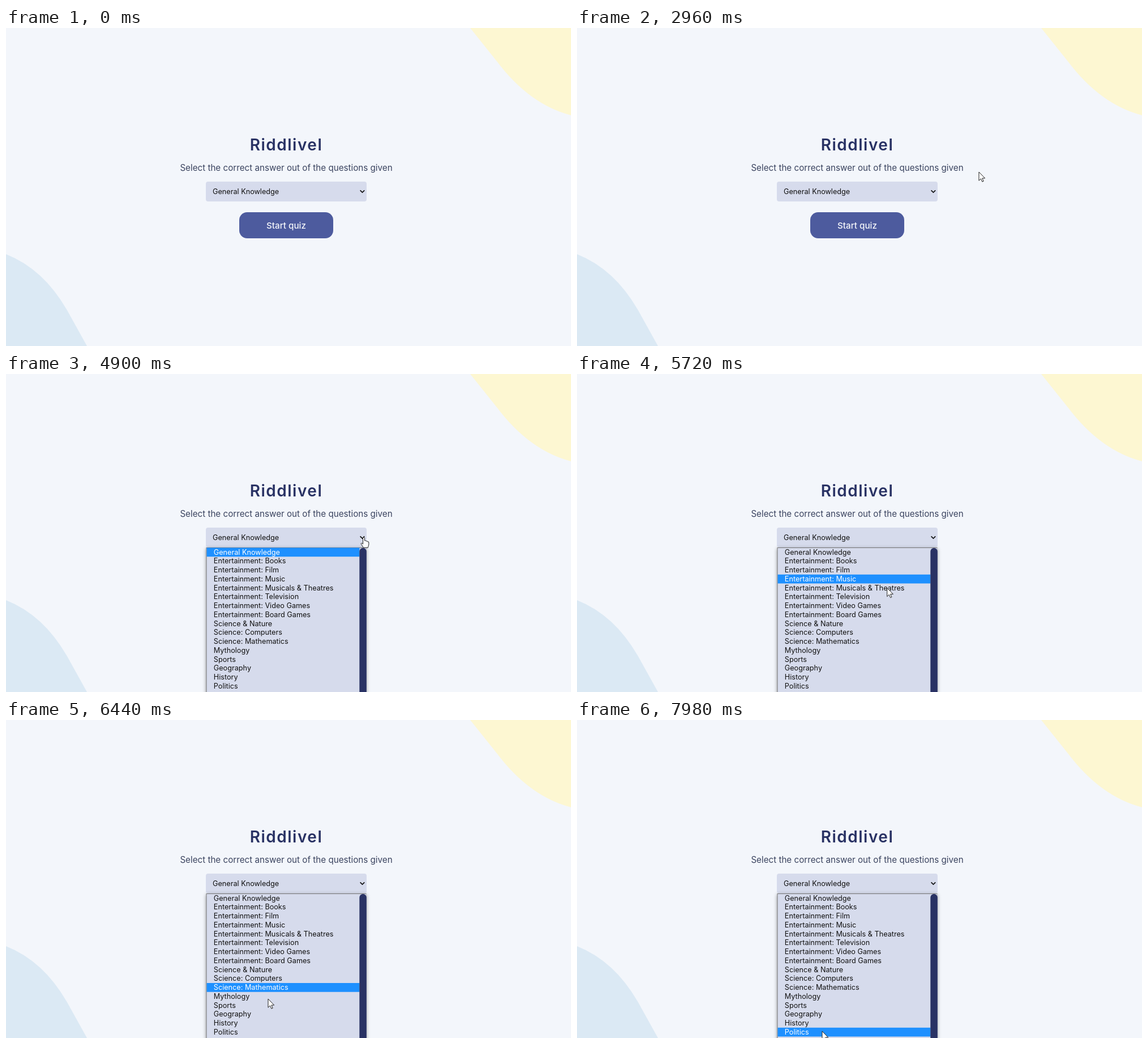
An HTML page for the animation above (8 s loop, 998 px wide and 561 px high).

```html
<!DOCTYPE html>
<html lang="en">
<head>
<meta charset="utf-8">
<title>Quiz start page</title>
<style>
  html, body { margin: 0; width: 100%; height: 100%; overflow: hidden; background: #f3f6fb; }
  svg { display: block; width: 998px; height: 561px; font: 400 12.67px Inter, sans-serif; }
  .mid { text-anchor: middle; }
  .title { font-size: 28px; font-weight: 600; letter-spacing: 1.5px; fill: #293264; }
  .lead { font-size: 15.2px; fill: #3a435f; }
  .start { font-size: 15.2px; font-weight: 500; fill: #f5f7fb; }
  .field { fill: #d6dbec; }
  .panel { fill: #777; filter: drop-shadow(0 2px 3px rgba(0, 0, 0, .4)); }
  .cursor { fill: #fff; stroke: #222; stroke-linejoin: round; }
</style>
</head>
<body>
<svg viewBox="0 0 998 561">
  <path fill="#fdf7d2" d="M820 0L868 60Q925 135 998 154V0Z"/>
  <path fill="#dbe9f4" d="M0 399Q66 425 108 498L143 561H0Z"/>

  <text class="mid title" x="495" y="215.5">Riddlivel</text>
  <text class="mid lead" x="495" y="251.6">Select the correct answer out of the questions given</text>

  <rect class="field" x="353" y="271" width="284" height="35" rx="4"/>
  <text x="365" y="292.7" fill="#111">General Knowledge</text>
  <path d="M625.6 286.3l3.8 3.8l3.8-3.8" fill="none" stroke="#111" stroke-width="1.7"/>

  <rect x="412" y="325" width="166" height="46" rx="14" fill="#4d5b9e"/>
  <text class="mid start" x="495" y="354">Start quiz</text>

  <g id="menu">
    <rect class="panel" x="353.5" y="306" width="283" height="290"/>
    <rect class="field" x="354.5" y="307" width="282" height="260"/>
    <rect id="mark" x="354.5" width="270" height="15.75" fill="#1e90ff"/>
    <rect x="624.3" y="307" width="12.5" height="270" rx="6" fill="#293264"/>
  </g>

  <path id="arrow" class="cursor" d="M0 0V15.2L3.5 11.9L5.9 17.2L8.2 16.2L5.9 11H10.7Z"/>
  <path id="hand" class="cursor" d="M-1.5 12V1Q0-1 1.5 1V6Q3 4.5 4.2 7Q6 5.5 6.6 8Q8.5 7 8.8 9V13L7.2 18.5H-.4L-5 11.5Q-4.5 9-1.5 12Z"/>
</svg>
<script>
const LOOP = 8000, ROW = 15.75, TOP = 306.5, OPEN = 4760, LAG = 75;
const names = ["General Knowledge",
  ...["Books", "Film", "Music", "Musicals & Theatres", "Television", "Video Games", "Board Games"]
    .map(name => "Entertainment: " + name),
  ...["& Nature", ": Computers", ": Mathematics"]
    .map(name => "Science" + (name[0] === "&" ? " " : "") + name),
  "Mythology", "Sports", "Geography", "History", "Politics"];

// Where the pointer turns or rests
const stops = [
  { t: 1820, x: 0, y: 384 },
  { t: 2220, x: 342, y: 252 },
  { t: 2500, x: 517, y: 229 },
  { t: 2960, x: 710, y: 254 },
  { t: 4180, x: 632, y: 288 },
  { t: 4980, x: 632, y: 288 },
  { t: 6000, x: 516, y: 411 },
  { t: 6440, x: 463, y: 492 },
  { t: 7440, x: 450, y: 523 },
  { t: 7980, x: 433, y: 549 }
];

const [menu, mark, arrow, hand] =
  ["menu", "mark", "arrow", "hand"].map(id => document.getElementById(id));
const show = (node, on) => node.style.display = on ? "" : "none";

const rows = names.map((name, i) => {
  const row = document.createElementNS("http://www.w3.org/2000/svg", "text");
  row.setAttribute("x", 366.8);
  row.setAttribute("y", TOP + ROW * i + 12.1);
  row.textContent = name;
  return menu.appendChild(row);
});

function pointer(t) {
  const next = stops.findIndex(stop => stop.t > t);
  if (next < 1) return next ? stops.at(-1) : stops[0];
  const a = stops[next - 1], b = stops[next];
  const k = (t - a.t) / (b.t - a.t);
  return { x: a.x + (b.x - a.x) * k, y: a.y + (b.y - a.y) * k };
}

function draw() {
  const t = performance.now() % LOOP;
  const { x, y } = pointer(t);
  // The pointer is not shown while it crosses the text line
  const visible = t >= 1820 && t < 2220 || t >= 2500;
  const pointing = t >= 4180 && y < TOP;
  for (const node of [arrow, hand]) node.setAttribute("transform", `translate(${x} ${y})`);
  show(arrow, visible && !pointing);
  show(hand, pointing);
  show(menu, t >= OPEN);

  const active = Math.max(0, Math.floor((pointer(t - LAG).y - TOP) / ROW));
  mark.setAttribute("y", TOP + ROW * active);
  rows.forEach((row, i) => row.setAttribute("fill", i === active ? "#fff" : "#111"));
  requestAnimationFrame(draw);
}
draw();
</script>
</body>
</html>
```
